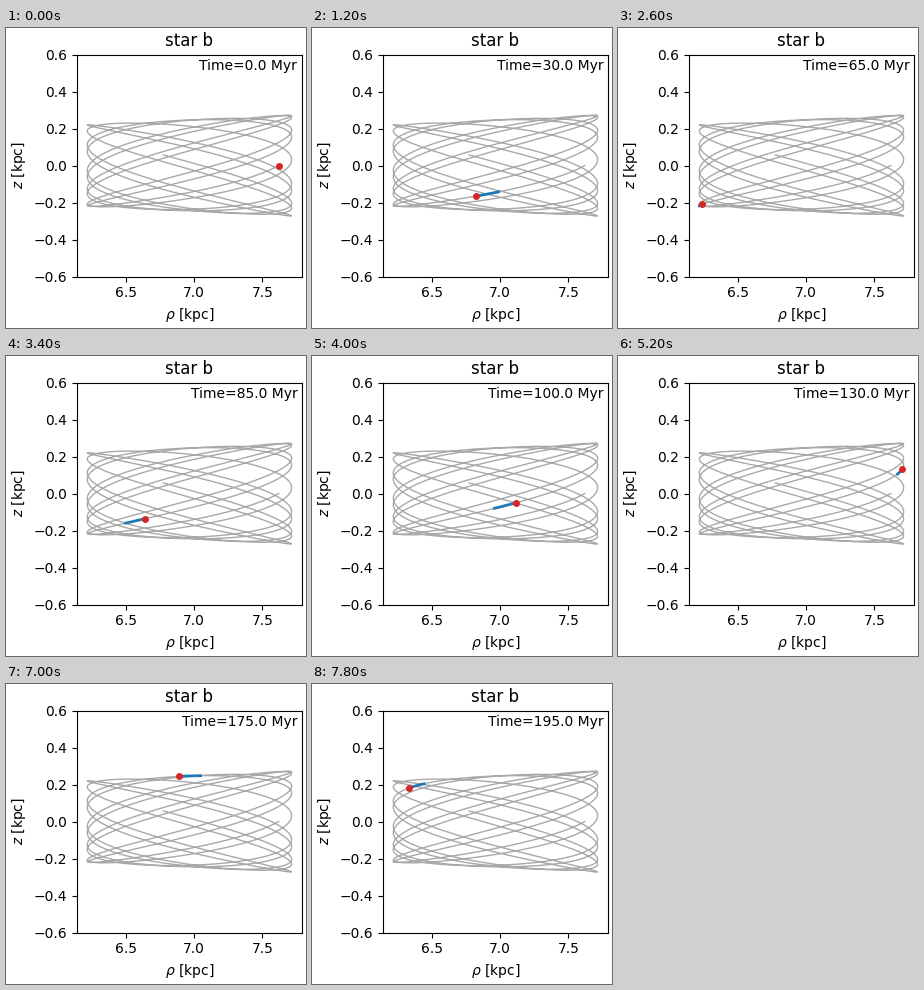
A matplotlib script that plays this animation: 300x300 px, repeating every 8 s.

```python
import numpy as np
import matplotlib.pyplot as plt
from matplotlib.animation import FuncAnimation

STEP = 5.0          # Myr per frame
FRAMES = 40
T_END = 1500.0      # length of the drawn orbit, Myr

KAPPA = 0.04279     # radial frequency, rad/Myr
T_PERI = 60.45      # time of the first inner turning point, Myr
SPIN = 1.3196       # angular momentum, kpc^2/Myr
TILT = 0.0354       # slope of the orbital plane


def radius(t):
    phi = KAPPA * (t - T_PERI)
    return 6.965 - 0.75 * np.cos(phi) + 0.063 * np.sin(phi) ** 2


# the angle along the orbit follows from d(angle)/dt = SPIN / rho^2
times = np.linspace(0, T_END, 6001)
rate = SPIN / radius(times) ** 2
steps = 0.5 * (rate[1:] + rate[:-1]) * np.diff(times)
angles = np.concatenate([[0], np.cumsum(steps)])


def orbit(t):
    """Radius and height (kpc) at time t (Myr)."""
    rho = radius(t)
    return rho, -TILT * rho * np.sin(np.interp(t, times, angles))


fig, ax = plt.subplots(figsize=(3, 3), dpi=100, layout="constrained")
ax.plot(*orbit(times), color="darkgrey", lw=1)
trail, = ax.plot([], [], color="tab:blue", lw=2)
star, = ax.plot([], [], "o", color="tab:red", ms=4)
clock = ax.text(0.98, 0.98, "", transform=ax.transAxes, ha="right", va="top")
ax.set(xlim=(6.14, 7.79), ylim=(-0.6, 0.6), title="star b",
       xlabel=r"$\rho$ [kpc]", ylabel=r"$z$ [kpc]")
ax.set_xticks([6.5, 7.0, 7.5])
ax.set_yticks(np.linspace(-0.6, 0.6, 7))


def update(i):
    now = i * STEP
    trail.set_data(*orbit(np.linspace(max(now - STEP, 0), now, 12)))
    rho, z = orbit(now)
    star.set_data([rho], [z])
    clock.set_text(f"Time={now:.1f} Myr")
    return trail, star, clock


anim = FuncAnimation(fig, update, frames=FRAMES, interval=200,
                     repeat=True, repeat_delay=0)
plt.show()
```
